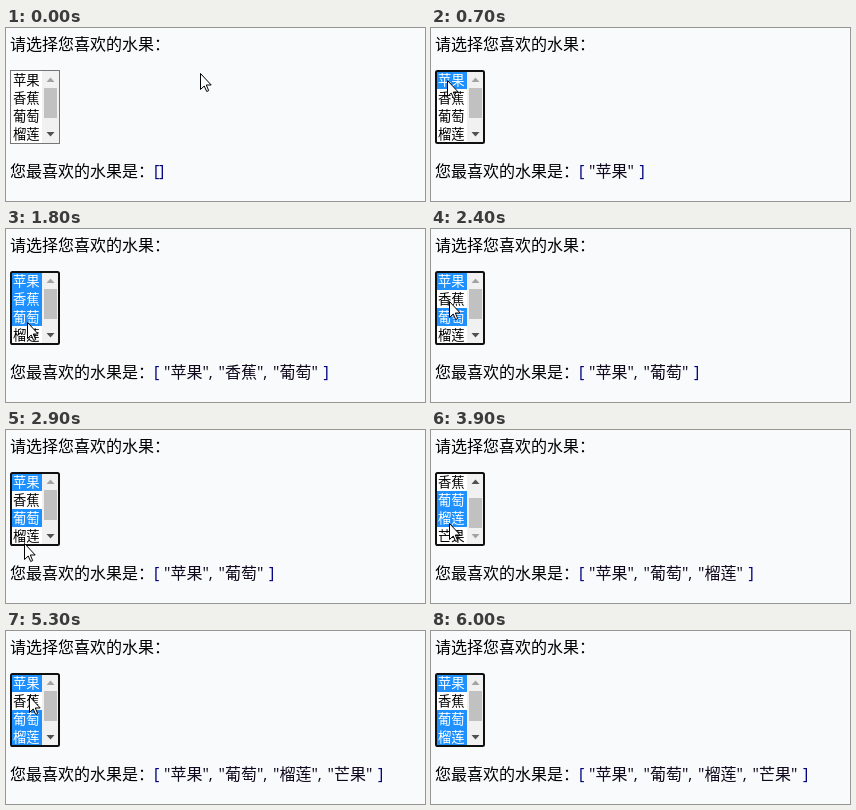
These frames come from a looping animation (419 px wide and 173 px high, 6700 ms). An HTML page:

```html
<!DOCTYPE html>
<html lang="zh-CN">
<head>
<meta charset="utf-8">
<style>
  html, body { margin: 0; width: 100%; height: 100%; overflow: hidden; background: #f8fafc; }
  svg { display: block; }
  text { font: 16px "Open Sans", "Noto Sans CJK SC", "Noto Sans CJK", sans-serif; white-space: pre; }
  .cjk, .option text { font-family: "Noto Sans CJK SC", "Noto Sans CJK", sans-serif; }
  .option text { font-size: 13.333px; }
  .option rect { fill: none; }
  .option.on rect { fill: #1e90ff; }
  .option.on text { fill: #fff; }
  .bracket { fill: #000080; }
  .item { fill: #10081c; }
</style>
</head>
<body>
<svg width="419" height="173" viewBox="0 0 419 173">
  <defs><clipPath id="view"><rect x="5" y="43" width="48" height="72"/></clipPath></defs>
  <text class="cjk" x="4" y="22">请选择您喜欢的水果：</text>
  <rect x="5" y="43" width="48" height="72" fill="#fff"/>
  <g clip-path="url(#view)">
    <g id="list"></g>
    <rect x="36" y="43" width="17" height="72" fill="#f1f1f1"/>
    <rect id="thumb" x="38" y="60" width="13" height="30" fill="#c1c1c1"/>
    <path id="up" d="M40.5 54L44.5 49.5L48.5 54Z"/>
    <path id="down" d="M40.5 104L44.5 108.5L48.5 104Z"/>
  </g>
  <rect id="border" x="4.5" y="42.5" width="49" height="73" fill="none" stroke="#767676"/>
  <rect id="ring" x="5" y="43" width="48" height="72" rx="1.5" fill="none" stroke="#101010" stroke-width="2"/>
  <text class="cjk" x="4" y="149">您最喜欢的水果是：</text>
  <g id="result"></g>
  <path id="cursor" d="M.5 .5V16.5L4.2 13L6.7 18.5L8.7 17.6L6.3 12H11.2Z" fill="#fff" stroke="#000"/>
</svg>
<script>
const LOOP = 6700, STEP = 100, ROW = 18, ITEM = 54.5, TRAVEL = 300;

// Each fruit with the times its selection is toggled
const toggles = { 苹果: [700], 香蕉: [1400, 2400], 葡萄: [1400], 榴莲: [3200], 芒果: [4200] };
const fruits = Object.keys(toggles);

// Cursor stops: [arrival ms, x, y]
const stops = [
  [0, 194, 45], [300, 2, 67], [500, 16, 52], [1300, 16, 87], [1800, 21, 93],
  [2000, 15, 100], [2400, 18, 72], [2900, 18, 113], [3600, 18, 93],
  [4400, 25, 98], [4500, 27, 71], [5000, 23, 65], [5800, 23, 87]
];

const $ = id => document.getElementById(id);
const ramp = (t, from, to) => Math.min(1, Math.max(0, (t - from) / (to - from)));
const show = (id, on) => { $(id).style.display = on ? "" : "none"; };
const arrow = (id, on) => $(id).setAttribute("fill", on ? "#505050" : "#a3a3a3");

function make(tag, attrs, parent, text = "") {
  const el = document.createElementNS("http://www.w3.org/2000/svg", tag);
  for (const name in attrs) el.setAttribute(name, attrs[name]);
  el.textContent = text;
  return parent.appendChild(el);
}

const options = fruits.map((name, i) => {
  const g = make("g", { class: "option" }, $("list"));
  const y = 43 + i * ROW;
  make("rect", { x: 5, y, width: 31, height: ROW }, g);
  make("text", { x: 7, y: y + 14 }, g, name);
  return g;
});

const chosenAt = t => fruits.filter(f => toggles[f].filter(at => at <= t).length % 2);

function showResult(chosen) {
  const box = $("result"), n = chosen.length;
  const put = (x, text, cls) => make("text", { x, y: 149, class: cls }, box, text);
  box.replaceChildren();
  put(148, "[", "bracket");
  put(n ? 154 + n * ITEM : 153, "]", "bracket");
  chosen.forEach((name, i) =>
    put(158 + i * ITEM, `"${name}"` + (i < n - 1 ? "," : ""), "item"));
}

// The cursor rests at a stop, then leaves just in time for the next one
function cursorAt(t) {
  const i = stops.findIndex(s => s[0] > t);
  if (i < 0) return stops.at(-1).slice(1);
  const [t0, ...from] = stops[i - 1], [t1, ...to] = stops[i];
  const p = ramp(t, Math.max(t0, t1 - TRAVEL), t1);
  return from.map((v, k) => Math.round(v + (to[k] - v) * p));
}

let shown = null;

function draw(t) {
  const chosen = chosenAt(t);
  if (String(chosen) !== shown) {
    shown = String(chosen);
    showResult(chosen);
    options.forEach((g, i) => g.classList.toggle("on", chosen.includes(fruits[i])));
  }
  const scroll = ramp(t, 3700, 3900) - ramp(t, 5100, 5300);
  $("list").setAttribute("transform", `translate(0 ${-ROW * scroll})`);
  $("thumb").setAttribute("y", 60 + 8 * scroll);
  arrow("up", scroll > 0);
  arrow("down", scroll < 1);
  show("border", t < 700);
  show("ring", t >= 700);
  show("cursor", t < 6000);
  $("cursor").setAttribute("transform", `translate(${cursorAt(t)})`);
}

const start = performance.now();
function tick() {
  const t = (performance.now() - start) % LOOP;
  draw(Math.floor(t / STEP) * STEP);
  requestAnimationFrame(tick);
}
tick();
</script>
</body>
</html>
```
